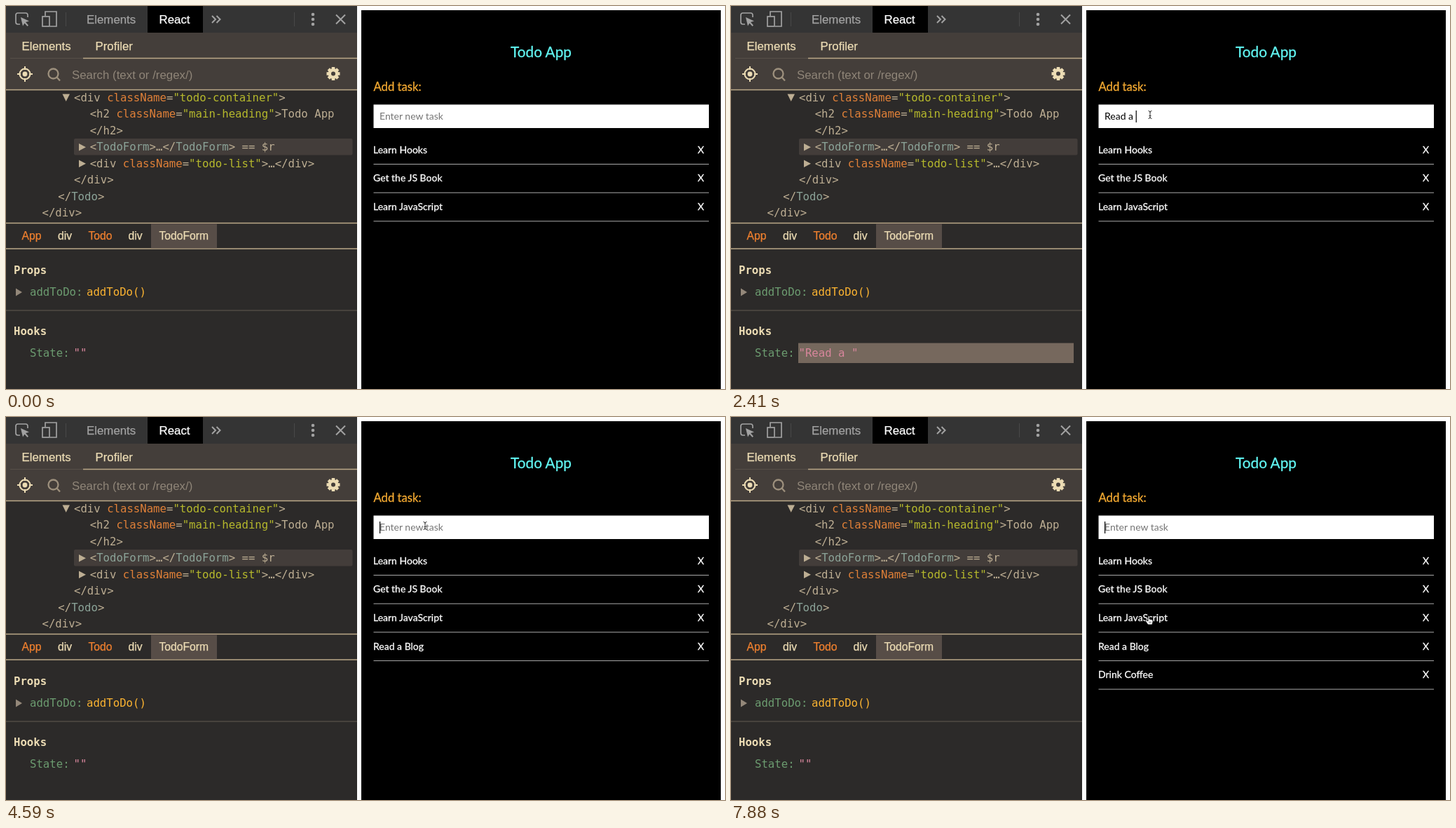
An HTML page for the animation above (8000 ms loop, 1026 by 546 pixels).

```html
<!DOCTYPE html>
<html lang="en">
<head>
<meta charset="utf-8">
<title>Todo App</title>
<style>
  html, body { margin: 0; width: 100%; height: 100%; overflow: hidden; background: #fff; }
  svg { display: block; width: 100vw; height: 100vh; }
  text { white-space: pre; }
  .ui { font: 16.85px "Liberation Sans", Arial, sans-serif; stroke-width: .25px; }
  .crumb { font-size: 15.7px; }
  .code { font: 15.67px "DejaVu Sans Mono", monospace; fill: #bdae93; }
  .bold { font-weight: bold; fill: #ecdcb4; }
  .page { font: 14px Lato, "Open Sans", sans-serif; stroke-width: .3px; }
  .attr { fill: #e08038; }
  .str { fill: #b6b92c; }
  .tag { fill: #8ba398; }
  .key { fill: #6c9c70; }
  .cream { fill: #ecdcb4; stroke: #ecdcb4; }
  .orange { fill: #f0802f; stroke: #f0802f; }
  .white { fill: #fff; stroke: #fff; }
  .icon { fill: none; stroke: #a2a2a2; stroke-width: 1.7; }
  .rule { stroke: #bba888; stroke-width: 1.4; }
</style>
</head>
<body>
<svg viewBox="0 0 1026 546" preserveAspectRatio="none">
  <rect width="1026" height="546" fill="#fff"/>

  <!-- Developer tools -->
  <rect width="501" height="546" fill="#2c2a29"/>
  <rect width="501" height="38" fill="#343434"/>
  <rect x="202" width="79" height="38" fill="#000"/>
  <rect y="38" width="501" height="82" fill="#443e3a"/>
  <path class="rule" d="M110 74.5H501M0 119.5H501M0 309.5H501M0 346H501" fill="none"/>
  <path d="M6 74.5H110" stroke="#575049"/>
  <path d="M85.5 9V29M411.5 9V29" stroke="#484848"/>

  <g class="icon">
    <path d="M20 26H17Q14 26 14 23V13Q14 10 17 10H28Q31 10 31 13V16"/>
    <path d="M21 16L33 21.5L28 23L32 27.5L30.5 29L26.5 24.5L24 28.5Z" fill="#a2a2a2" stroke="none"/>
    <path d="M56 14V8H72V29H63"/>
    <rect x="52" y="15" width="10" height="14"/>
    <path d="M294 14L299 19L294 24M300.5 14L305.500 19L300.500 24M471 12.500L484 25.500M484 12.500L471 25.500" stroke-width="2"/>
    <g fill="#a2a2a2" stroke="none">
      <circle cx="438" cy="12" r="2.300"/><circle cx="438" cy="19" r="2.300"/><circle cx="438" cy="26" r="2.300"/>
    </g>
    <g stroke="#ecdcb4" stroke-width="2">
      <circle cx="27" cy="97" r="7.500"/>
      <path d="M27 86V91M27 103V108M16 97H21M33 97H38"/>
      <circle cx="27" cy="97" r="3.400" fill="#ecdcb4" stroke="none"/>
    </g>
    <g stroke="#9d907d" stroke-width="2.300">
      <circle cx="67.500" cy="96.500" r="7"/><path d="M72.500 101.500L77 106.500"/>
    </g>
    <g stroke="#ecdcb4">
      <circle cx="467" cy="96.500" r="5.200" stroke-width="4.400"/>
      <path id="teeth" stroke-width="4.600"/>
    </g>
  </g>

  <g class="ui">
    <text x="115" y="25" fill="#a2a2a2" stroke="#a2a2a2">Elements</text>
    <text x="218.500" y="25" class="white">React</text>
    <text x="22.500" y="63" class="cream">Elements</text>
    <text x="127.500" y="63" class="cream">Profiler</text>
    <text x="94" y="103.500" fill="#8f8578">Search (text or /regex/)</text>
  </g>

  <rect x="97" y="189" width="397.500" height="23.500" rx="2" fill="#433d3a"/>
  <g fill="#bdae93">
    <path d="M80.500 125.500H91L85.700 136Z"/>
    <path d="M104 196L114 201.300L104 206.600Z"/>
    <path d="M104 219.500L114 224.800L104 230.100Z"/>
  </g>
  <g class="code">
    <text x="97" y="135.700">&lt;div <tspan class="attr">className</tspan>=<tspan class="str">"todo-container"</tspan>&gt;</text>
    <text x="119.700" y="159.200">&lt;h2 <tspan class="attr">className</tspan>=<tspan class="str">"main-heading"</tspan>&gt;Todo App</text>
    <text x="119.700" y="182.700">&lt;/h2&gt;</text>
    <text x="119.700" y="206.200">&lt;<tspan class="tag">TodoForm</tspan>&gt;…&lt;/<tspan class="tag">TodoForm</tspan>&gt; == $r</text>
    <text x="119.700" y="229.700">&lt;div <tspan class="attr">className</tspan>=<tspan class="str">"todo-list"</tspan>&gt;…&lt;/div&gt;</text>
    <text x="97" y="253.200">&lt;/div&gt;</text>
    <text x="74.300" y="276.700">&lt;/<tspan class="tag">Todo</tspan>&gt;</text>
    <text x="51.500" y="300.200">&lt;/div&gt;</text>
  </g>

  <rect x="207" y="310.200" width="94" height="35.100" fill="#574d47"/>
  <g class="ui">
    <text x="22.500" y="333" class="crumb orange">App</text>
    <text x="74" y="333" class="crumb cream">div</text>
    <text x="117.500" y="333" class="crumb orange">Todo</text>
    <text x="174.500" y="333" class="crumb cream">div</text>
    <text x="218.500" y="333" class="crumb cream">TodoForm</text>
  </g>

  <path d="M0 434H501" stroke="#514a45" stroke-width="1.300"/>
  <path d="M14 402.500L23 408L14 413.500Z" fill="#94887a"/>
  <rect id="flash" x="96" y="480.500" width="393" height="28.500" fill="#8a796c"/>
  <g class="code">
    <text x="11" y="381.500" class="bold">Props</text>
    <text x="34" y="413" class="key">addToDo:</text>
    <text x="115" y="413" fill="#fbb331">addToDo()</text>
    <text x="11" y="468.500" class="bold">Hooks</text>
    <text x="34" y="500" class="key">State:</text>
    <text id="state" x="96.500" y="500" fill="#d8869c"></text>
  </g>

  <!-- Page -->
  <rect x="507" y="6" width="513" height="540" fill="#000"/>
  <rect x="524.500" y="140.500" width="478.500" height="33.500" fill="#fff"/>
  <g class="page">
    <text x="763.500" y="73" text-anchor="middle" font-size="20.800" style="font-size:20.8px" fill="#61f5f2" stroke="#61f5f2">Todo App</text>
    <text x="524.500" y="120.500" style="font-size:16.7px" fill="#f6ab32" stroke="#f6ab32">Add task:</text>
    <text id="hint" x="533" y="162.300" fill="#757575">Enter new task</text>
    <text id="field" x="533" y="162.300" fill="#000"></text>
    <g id="list" class="white"></g>
  </g>
  <rect id="caret" y="149" width="1.200" height="17" fill="#000"/>

  <!-- Pointers, each drawn around its hot spot -->
  <g id="arrow"><path d="M0 0V15L3.500 11.800L6 17.500L8.500 16.400L6 10.900H10.800Z" fill="#000" stroke="#fff"/></g>
  <g id="beam" fill="none">
    <path d="M-2.500 -5.500Q0 -5.500 0 -3.500Q0 -5.500 2.500 -5.500M0 -4V4M-2.500 5.500Q0 5.500 0 3.500Q0 5.500 2.500 5.500M-1.500 1.500H1.500" stroke="#333"/>
  </g>
  <g id="hand">
    <path d="M-2 -5Q-1 -6.500 0 -5V-1L4 0Q5.500 .5 5 3L4 7H-2L-5.500 2Q-5 0 -3.500 1L-2 2Z" fill="#fff" stroke="#000" stroke-width=".8"/>
    <path d="M0 2.500V5M2 2.500V5" stroke="#000" stroke-width=".6"/>
  </g>
</svg>
<script>
const LOOP = 8000, LAG = 60, FADE = 530, CLICK = 640;
const FIRST_BLINK = 420, BLINK = 350;

const entries = [
  { text: "Read a Blog", enter: 3820,
    keys: [1240, 1280, 1310, 1340, 1960, 2080, 2240, 2560, 2970, 3140, 3300] },
  { text: "Drink Coffee", enter: 6985,
    keys: [5290, 5485, 5625, 5740, 5850, 5960, 6080, 6190, 6300, 6410, 6530, 6640] }
];
const edits = entries.flatMap(({ text, enter, keys }) => [
  ...keys.map((at, i) => ({ at, text: text.slice(0, i + 1) })),
  { at: enter, text: "" }
]);

// Pointer stops: time, x, y
const path = [
  [290, 562, 13], [640, 598, 155], [7330, 598, 155],
  [7530, 1010, 285], [7710, 657, 272], [7880, 597, 289]
];

const $ = id => document.getElementById(id);
const [flash, state, hint, field, caret, arrow, beam, hand] =
  ["flash", "state", "hint", "field", "caret", "arrow", "beam", "hand"].map($);
const show = (el, on) => { el.style.display = on ? "" : "none"; };
const setText = (el, text) => { if (el.textContent !== text) el.textContent = text; };

$("teeth").setAttribute("d", [...Array(8)].map((_, i) => {
  const a = i * Math.PI / 4, c = Math.cos(a), s = Math.sin(a);
  return `M${467 + 6 * c} ${96.5 + 6 * s}L${467 + 9.5 * c} ${96.5 + 9.5 * s}`;
}).join(""));

const tasks = ["Learn Hooks", "Get the JS Book", "Learn JavaScript", ...entries.map(e => e.text)];
$("list").innerHTML = tasks.map((task, i) => {
  const y = 40.65 * i;
  return `<g><text x="524" y="${209.8 + y}">${task}</text>
    <text x="987" y="${209.8 + y}">X</text>
    <path d="M524.5 ${225.5 + y}H1003" stroke="#aaa" stroke-width="1"/></g>`;
}).join("");
const rows = [...$("list").children];

const lastEdit = t => edits.filter(e => e.at <= t).pop() || { at: -Infinity, text: "" };

function pointerAt(t) {
  const next = path.findIndex(p => p[0] > t);
  if (next < 0) return path[path.length - 1].slice(1);
  const [t0, x0, y0] = path[next - 1], [t1, x1, y1] = path[next];
  const u = (t - t0) / (t1 - t0), k = u * u * (3 - 2 * u);
  return [x0 + (x1 - x0) * k, y0 + (y1 - y0) * k];
}

function caretOn(t, editedAt) {
  if (t < CLICK) return false;
  const since = t - Math.max(CLICK, editedAt) - FIRST_BLINK;
  return since < 0 || Math.floor(since / BLINK) % 2 === 1;
}

function drawPointer(t) {
  const visible = t >= path[0][0];
  const [x, y] = visible ? pointerAt(t) : [0, 0];
  const overField = x > 524 && x < 1003 && y > 140 && y < 174;
  const overList = x > 524 && x < 1003 && y > 190;
  const active = overField ? beam : overList ? hand : arrow;
  for (const el of [arrow, beam, hand]) show(el, visible && el === active);
  active.setAttribute("transform", `translate(${x} ${y})`);
}

function draw(t) {
  const typed = lastEdit(t), stored = lastEdit(t - LAG);
  setText(field, typed.text);
  show(hint, !typed.text);
  setText(state, `"${stored.text}"`);
  flash.setAttribute("opacity", Math.max(0, 1 - (t - LAG - stored.at) / FADE));
  rows.forEach((row, i) => show(row, i < 3 || t >= entries[i - 3].enter));
  show(caret, caretOn(t, typed.at));
  caret.setAttribute("x", 533 + (typed.text ? field.getComputedTextLength() : 0));
  drawPointer(t);
}

const start = performance.now();
function tick() {
  draw((performance.now() - start) % LOOP);
  requestAnimationFrame(tick);
}
tick();
</script>
</body>
</html>
```
